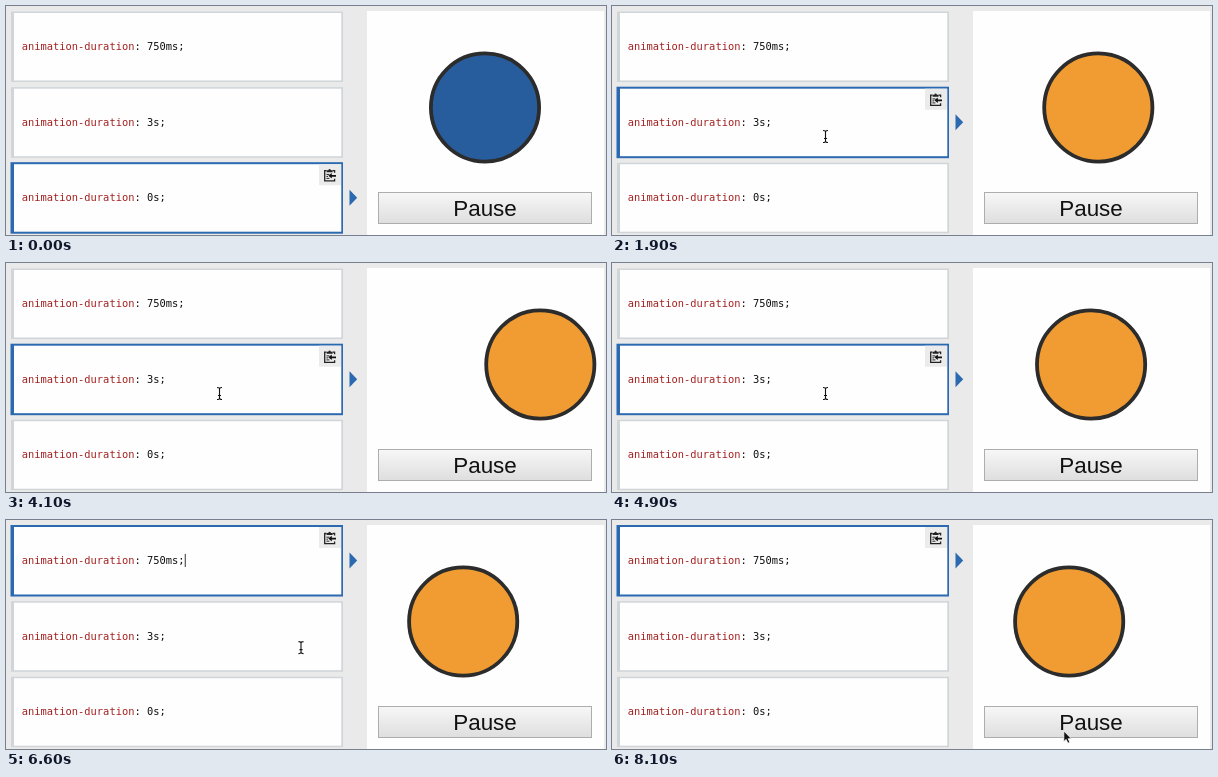
Recreate the animation shown at these times as an HTML page. Size 600 px wide and 229 px high, loop 8200 ms.

```html
<!DOCTYPE html>
<html lang="en">
<head>
<meta charset="utf-8">
<title>animation-duration</title>
<style>
  html, body { margin: 0; width: 100%; height: 100%; overflow: hidden; background: #ebeaea; }
  svg { display: block; width: 600px; height: 229px; }
  .code { font: 10.4px "DejaVu Sans Mono", monospace; white-space: pre; fill: #111; }
  .prop { fill: #a3201f; }
  .label { font: 22.4px "Liberation Sans", Arial, sans-serif; text-anchor: middle; fill: #111; }
  .box .off { fill: #cfd5d8; }
  .box .on { fill: #2b69b1; }
  .box .on, .box .copy { visibility: hidden; }
  .box.selected .on, .box.selected .copy { visibility: visible; }
</style>
</head>
<body>
<svg viewBox="0 0 600 229">
  <defs>
    <linearGradient id="face" x1="0" y1="0" x2="0" y2="1">
      <stop offset="0" stop-color="#f7f7f7"/>
      <stop offset="1" stop-color="#dedede"/>
    </linearGradient>
    <clipPath id="panel"><rect x="361" y="5" width="237" height="224"/></clipPath>
    <g id="copy">
      <rect x="313" y="2" width="22" height="21" fill="#ebebeb"/>
      <path d="M320.5 8.5H318.7V18.6H328.6V16.6M326.6 8.5H328.6V10.6" fill="none" stroke="#222" stroke-width="1.3"/>
      <path d="M320.6 10V8H322.2Q323.6 5.6 325 8H326.6V10Z" fill="#222"/>
      <path d="M320.4 12.2H323.4M320.4 14.2H322M320.4 16.2H323.4" stroke="#222"/>
      <path d="M322.3 13.6 325.8 10.8V12.7H330V14.5H325.8V16.4Z" fill="#111"/>
    </g>
  </defs>
  <rect width="600" height="229" fill="#ebeaea"/>
  <g id="boxes"></g>
  <path id="pointer" d="M343.5 -8L351.2 0L343.5 8Z" fill="#2b69b1"/>
  <rect id="caret" width="1" height="13" fill="#333"/>
  <rect x="361" y="5" width="237" height="224" fill="#fefefe"/>
  <g clip-path="url(#panel)">
    <circle id="ball" cy="101.5" r="54.1" stroke="#2c2c2c" stroke-width="3.8"/>
  </g>
  <rect x="372.5" y="186.5" width="213" height="31" fill="url(#face)" stroke="#adadad"/>
  <text class="label" x="479" y="210">Pause</text>
  <path id="beam" d="M-2.5 -6Q0 -6 0 -4.5Q0 -6 2.5 -6M0 -4.5V4.5M-2.5 6Q0 6 0 4.5Q0 6 2.5 6M-1.5 2H1.5" fill="none" stroke="#111" stroke-width="1.1"/>
  <path id="arrow" d="M0 0V10.6L2.4 8.4L4 12.2L6 11.3L4.4 7.7H7.6Z" fill="#111" stroke="#fff" stroke-width=".8"/>
</svg>
<script>
const $ = id => document.getElementById(id);
const LOOP = 8200, STEP = 100;

const choices = [
  { value: "750ms", ms: 750, y: 5 },
  { value: "3s", ms: 3000, y: 80.7 },
  { value: "0s", ms: 0, y: 156.2 }
];
// [time, selected choice]
const picks = [[0, 2], [1300, 1], [6250, 0]];
// [time, x, y] of the mouse
const mouse = [
  [300, 390, 242], [800, 213.5, 130.5], [5500, 213.5, 130.5],
  [5800, 208.5, 100.5], [6100, 205, 50], [6400, 205, 50],
  [6900, 430, 244], [7600, 436, 242], [8100, 451.8, 211]
];
// the slide keeps its start time when the duration changes
const SLIDE_START = 341, SLIDE_X = 428.8, SLIDE_RANGE = 170.8;

$("boxes").innerHTML = choices.map(({ value, y }) => `
  <g class="box" transform="translate(0 ${y})">
    <rect class="off" x="5" y=".5" width="332" height="70.5"/>
    <rect class="on" x="4.5" y="0" width="332.5" height="71.5"/>
    <rect x="8" y="2" width="327.3" height="67.5" fill="#fefefe"/>
    <use class="copy" href="#copy"/>
    <text class="code" x="15.8" y="39.3"><tspan class="prop">animation-duration</tspan>: ${value};</text>
  </g>`).join("");
const boxes = [...document.querySelectorAll(".box")];

// cubic-bezier(.42, 0, 1, 1)
function easeIn(x) {
  let lo = 0, hi = 1;
  for (let i = 0; i < 24; i++) {
    const s = (lo + hi) / 2;
    if (1.26 * s + 0.48 * s * s - 0.74 * s ** 3 < x) lo = s; else hi = s;
  }
  return lo * lo * (3 - 2 * lo);
}

function ballX(t, ms) {
  const phase = (t - SLIDE_START) / ms % 2;
  return SLIDE_X + SLIDE_RANGE * easeIn(phase < 1 ? phase : 2 - phase);
}

function mouseAt(t) {
  const next = mouse.findIndex(k => k[0] > t);
  if (next === 0) return mouse[0].slice(1);
  if (next < 0) return mouse[mouse.length - 1].slice(1);
  const a = mouse[next - 1], b = mouse[next];
  const p = (t - a[0]) / (b[0] - a[0]);
  return [a[1] + (b[1] - a[1]) * p, a[2] + (b[2] - a[2]) * p];
}

const show = (el, on) => el.setAttribute("visibility", on ? "visible" : "hidden");
const move = (el, x, y) => el.setAttribute("transform", `translate(${x} ${y})`);

function draw(t) {
  const [since, pick] = picks.filter(p => p[0] <= t).pop();
  const { value, ms, y } = choices[pick];
  boxes.forEach((box, i) => box.classList.toggle("selected", i === pick));
  move($("pointer"), 0, y + 35.5);

  $("ball").setAttribute("cx", ms ? ballX(t, ms) : 479);
  $("ball").setAttribute("fill", ms ? "#f09c33" : "#285d9d");

  move($("caret"), 16 + (21 + value.length) * 6.26, y + 29);
  show($("caret"), since > 0 && (t - since - 10) % 995 < 500);

  const [mx, my] = mouseAt(t), overCode = mx < 337;
  move($("beam"), mx, my);
  move($("arrow"), mx, my);
  show($("beam"), overCode);
  show($("arrow"), !overCode);
}

const begin = performance.now();
function tick() {
  const t = (performance.now() - begin) % LOOP;
  draw(Math.floor(t / STEP) * STEP);
  requestAnimationFrame(tick);
}
tick();
</script>
</body>
</html>
```
